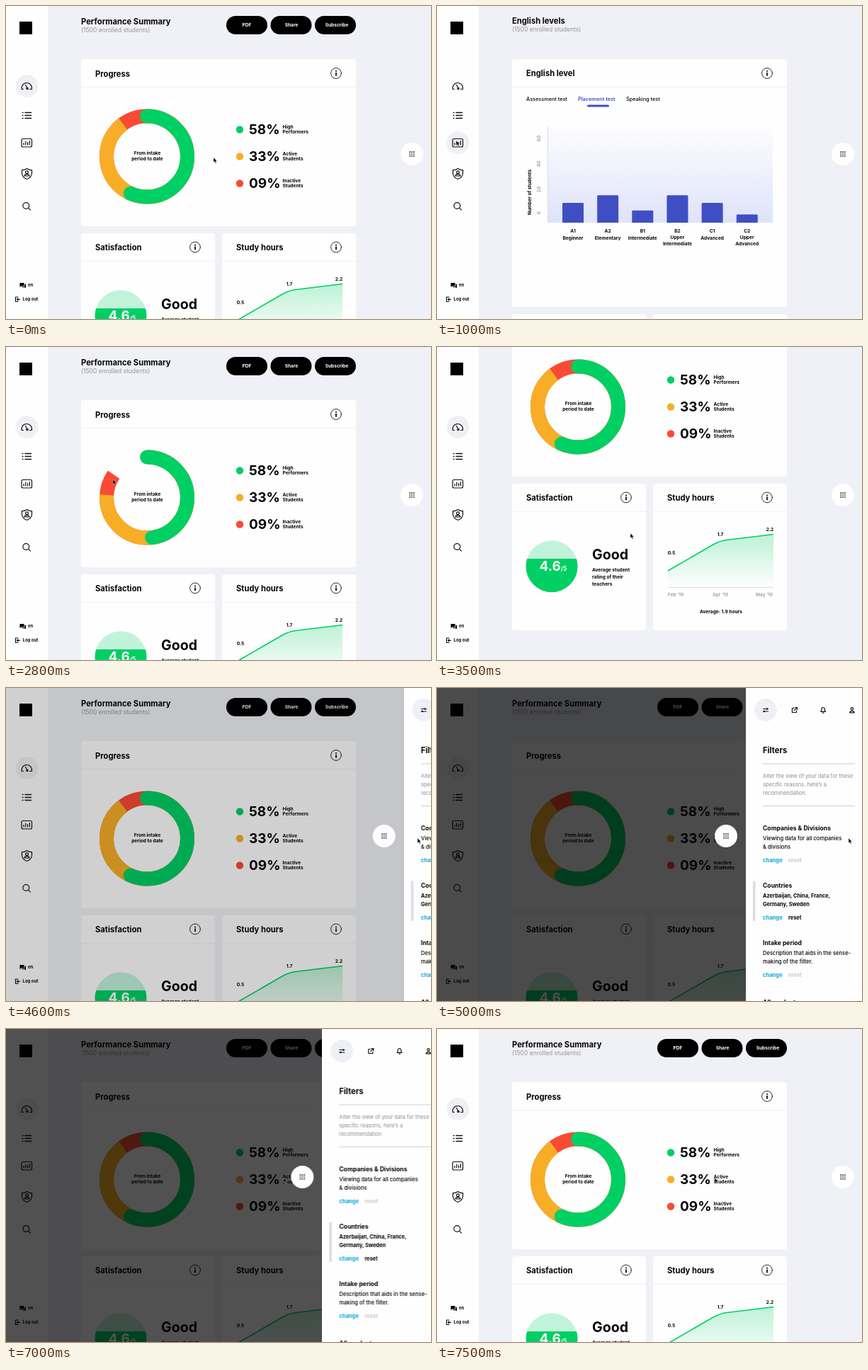
An HTML page for the animation above (7600 ms loop, 600x442 px).

```html
<!DOCTYPE html>
<html lang="en">
<head>
<meta charset="utf-8">
<title>Student dashboard</title>
<style>
html, body { margin: 0; width: 100%; height: 100%; overflow: hidden; background: #f0f1f6; }
svg { display: block; width: 600px; height: 442px; }
text { font: 700 6.6px Inter, "Open Sans", sans-serif; fill: #060607; }
.title { font-size: 11.2px; }
.sub { font-size: 8.5px; font-weight: 400; fill: #949498; }
.big { font-size: 19px; }
.mid { text-anchor: middle; }
.white { fill: #fff; }
.grey { fill: #8f8f94; font-weight: 500; }
.tab { font-size: 7.3px; font-weight: 500; }
.tab.on { fill: #3f4fc3; font-weight: 600; }
.head { font-size: 8.6px; }
.body { font-size: 7.6px; font-weight: 500; }
.note { font-size: 7.5px; font-weight: 400; fill: #8e8e93; }
.strong { font-size: 7.4px; }
.link { font-size: 7.6px; fill: #12a5dd; }
.off { fill: #ccc; }
.card { fill: #fefefe; }
.rule { stroke: #f1f1f5; }
.line { fill: none; stroke: #111113; stroke-width: 1.2; stroke-linecap: round; stroke-linejoin: round; }

.cursor, .scroll, .drawer, .shade, .filters, .home, .levels, .spot, .bar, .num, .arc {
  animation: 7.6s linear infinite;
}
.cursor { animation-name: cursor; animation-timing-function: ease-in-out; }
.scroll { animation-name: scroll; animation-timing-function: ease-in-out; }
.filters { animation-name: filters; animation-timing-function: ease-in-out; }
.drawer { animation-name: drawer; }
.shade { animation-name: shade; }
.home { animation-name: home; }
.levels { animation-name: levels; }
.spot { animation-name: spot; }
.bar { animation-name: bar; transform-origin: 0 306px; }
.num { animation-name: num; }
.arc { animation-name: arc; fill: none; stroke-width: 20; stroke-dasharray: var(--len) 200; }

@keyframes cursor {
  0% { transform: translate(293px, 214px); }
  6.58%, 19.74% { transform: translate(27px, 190px); }
  25%, 32.89% { transform: translate(27px, 110px); }
  40.79%, 51.32% { transform: translate(273px, 263px); }
  56.58%, 68.42% { transform: translate(581px, 212px); }
  73.68%, 81.58% { transform: translate(565px, 219px); }
  88.16%, 100% { transform: translate(392px, 210px); }
}
@keyframes scroll {
  0%, 40.79% { transform: none; }
  46.05%, 47.37% { transform: translateY(-128px); }
  51.32%, 100% { transform: none; }
}
@keyframes filters {
  0%, 68.42% { transform: none; }
  77.63%, 78.95% { transform: translateY(-65px); }
  85.53%, 100% { transform: none; }
}
@keyframes drawer {
  0%, 57.89% { transform: translateX(178px); }
  59.21% { transform: translateX(168px); }
  60.53% { transform: translateX(139px); }
  61.84% { transform: translateX(98px); }
  63.16% { transform: translateX(58px); }
  64.47% { transform: translateX(30px); }
  65.79% { transform: translateX(13px); }
  68.42%, 90.79% { transform: none; }
  92.11% { transform: translateX(23px); }
  93.42% { transform: translateX(74px); }
  94.74% { transform: translateX(125px); }
  96.05% { transform: translateX(158px); }
  97.37% { transform: translateX(173px); }
  98.68%, 100% { transform: translateX(178px); }
}
@keyframes shade {
  0%, 57.89% { opacity: 0; }
  59.21% { opacity: .04; }
  60.53% { opacity: .18; }
  61.84% { opacity: .34; }
  63.16% { opacity: .51; }
  64.47% { opacity: .63; }
  65.79% { opacity: .7; }
  68.42%, 90.79% { opacity: .75; }
  92.11% { opacity: .68; }
  93.42% { opacity: .44; }
  94.74% { opacity: .22; }
  96.05% { opacity: .08; }
  97.37% { opacity: .02; }
  98.68%, 100% { opacity: 0; }
}
@keyframes home {
  0%, 10.5% { opacity: 1; }
  10.51%, 31.55% { opacity: 0; }
  31.56%, 100% { opacity: 1; }
}
@keyframes levels {
  0%, 10.5% { opacity: 0; }
  10.51%, 31.55% { opacity: 1; }
  31.56%, 100% { opacity: 0; }
}
@keyframes spot {
  0%, 10.5% { transform: none; }
  10.51%, 31.55% { transform: translateY(80px); }
  31.56%, 100% { transform: none; }
}
@keyframes bar {
  0%, 10.5% { transform: scaleY(0); animation-timing-function: ease-out; }
  19.74%, 100% { transform: none; }
}
@keyframes num {
  0%, 13.16% { opacity: 0; }
  18.42%, 100% { opacity: 1; }
}
@keyframes arc {
  0%, 31.55% { stroke-dashoffset: 0; }
  31.56% { stroke-dashoffset: var(--len); animation-timing-function: ease-out; }
  39.47%, 100% { stroke-dashoffset: 0; }
}
</style>
</head>
<body>
<svg viewBox="0 0 600 442">
  <defs>
    <linearGradient id="plot" x2="0" y2="1">
      <stop stop-color="#fdfdff"/><stop offset="1" stop-color="#dfe3f9"/>
    </linearGradient>
    <linearGradient id="area" x2="0" y2="1">
      <stop stop-color="#00cf64" stop-opacity=".26"/><stop offset="1" stop-color="#00cf64" stop-opacity="0"/>
    </linearGradient>
    <clipPath id="dial"><circle cx="162" cy="437.700" r="36.500"/></clipPath>
    <clipPath id="panel"><rect y="64" width="177" height="378"/></clipPath>
    <g id="info">
      <circle class="line" r="7.400" style="stroke-width:.9"/>
      <circle cy="-3" r="1"/><path d="M0 -1V3.800" stroke="#000" stroke-width="1.700"/>
    </g>
    <g id="dots"></g>
  </defs>

  <rect width="600" height="442" fill="#f0f1f6"/>

  <g class="home"><g class="scroll">
    <text class="title" x="106" y="25.500">Performance Summary</text>
    <text class="sub" x="106" y="36.700">(1500 enrolled students)</text>
    <rect x="311" y="14" width="58" height="26" rx="13"/>
    <rect x="373.500" y="14" width="58" height="26" rx="13"/>
    <rect x="436" y="14" width="58" height="26" rx="13"/>
    <text class="mid white" x="340" y="29.400">PDF</text>
    <text class="mid white" x="403" y="29.400">Share</text>
    <text class="mid white" x="467" y="29.400">Subscribe</text>

    <rect class="card" x="106" y="75" width="388" height="236" rx="4"/>
    <path class="rule" d="M106 114.500H494"/>
    <text class="title" x="126" y="99.500">Progress</text>
    <use href="#info" x="466" y="95"/>
    <g transform="translate(199 212.600) rotate(-90)">
      <circle class="arc" r="57" pathLength="100" stroke="#fa4a33" style="--len:100"/>
      <circle class="arc" r="57" pathLength="100" stroke="#f7ae26" style="--len:89.9"/>
      <circle class="arc" r="57" pathLength="100" stroke="#00cf64" stroke-linecap="round" style="--len:56.7"/>
    </g>
    <text class="mid" x="199.500" y="209.800">From intake</text>
    <text class="mid" x="199.500" y="218.300">period to date</text>
    <g id="shares"></g>

    <rect class="card" x="106" y="321" width="189" height="207" rx="4"/>
    <rect class="card" x="305" y="321" width="189" height="207" rx="4"/>
    <path class="rule" d="M106 360.500H295M305 360.500H494"/>
    <text class="title" x="126" y="345">Satisfaction</text>
    <text class="title" x="325" y="345">Study hours</text>
    <use href="#info" x="267" y="340.500"/>
    <use href="#info" x="466" y="340.500"/>

    <g clip-path="url(#dial)">
      <rect x="125" y="400" width="74" height="75" fill="#c1f3db"/>
      <rect x="125" y="427" width="74" height="50" fill="#00cf64"/>
    </g>
    <text class="big white" x="144.500" y="443.800">4.6<tspan style="font-size:8.300px">/5</tspan></text>
    <text class="big" x="219" y="427.500" style="font-size:19.600px">Good</text>
    <text x="219" y="444.500">Average student</text>
    <text x="219" y="454.500">rating of their</text>
    <text x="219" y="464.500">teachers</text>

    <path d="M326 444L390 407Q400 401.500 409 400.500L475 392.500V467H326Z" fill="url(#area)"/>
    <path d="M326 444L390 407Q400 401.500 409 400.500L475 392.500" fill="none" stroke="#00cf64" stroke-width="1.600"/>
    <path d="M326 467.500H475" stroke="#dadade"/>
    <text class="mid" x="331" y="421">0.5</text>
    <text class="mid" x="400" y="394.500">1.7</text>
    <text class="mid" x="470" y="388">2.2</text>
    <text class="grey" x="326" y="479.500">Feb ’19</text>
    <text class="grey mid" x="400" y="479.500">Apr ’19</text>
    <text class="grey" x="474" y="479.500" text-anchor="end">May ’19</text>
    <text class="mid" x="401" y="504.400">Average: 1.9 hours</text>
  </g></g>

  <g class="levels">
    <text class="title" x="106" y="24.500">English levels</text>
    <text class="sub" x="106" y="35.700">(1500 enrolled students)</text>
    <rect class="card" x="106" y="75" width="388" height="350" rx="4"/>
    <rect class="card" x="106" y="435" width="189" height="30" rx="4"/>
    <rect class="card" x="305" y="435" width="189" height="30" rx="4"/>
    <path class="rule" d="M106 114.500H494"/>
    <text class="title" x="126" y="99">English level</text>
    <use href="#info" x="466" y="95"/>
    <text class="tab" x="126" y="134">Assessment test</text>
    <text class="tab on" x="199" y="134">Placement test</text>
    <text class="tab" x="267" y="134">Speaking test</text>
    <rect x="212" y="139.500" width="31" height="3" rx="1.500" fill="#3f4fc3"/>
    <rect x="156" y="170" width="318" height="136" fill="url(#plot)"/>
    <path d="M156.500 170V306" stroke="#dcdce2"/>
    <text class="mid" transform="translate(133 263) rotate(-90)">Number of students</text>
    <g id="bars"></g>
  </g>

  <rect width="59" height="442" fill="#fefefe"/>
  <rect x="19" y="22" width="18" height="18"/>
  <circle class="spot" cx="29.500" cy="113" r="16" fill="#f0f0f4"/>
  <g class="line">
    <path d="M24.500 117.500H22.200A7.300 7.300 0 1 1 36.400 117.500H33.500M27.500 111.500L30.500 117"/>
    <circle cx="30" cy="116.500" r="1.200"/>
    <path d="M27 150.500H35.500M27 154.500H35.500M27 158.500H35.500M23.300 150.500H24M23.300 154.500H24M23.300 158.500H24" stroke-width="1.500"/>
    <rect x="22" y="187.500" width="14.500" height="11.500" rx="2"/>
    <path d="M25 196V193.500M27.800 196V191M30.600 196V192.500M33.400 196V190.500"/>
    <path d="M29.500 229.500Q33 232 36.500 231.500V236.500Q36 242 29.500 244.500Q23 242 22.500 236.500V231.500Q26 232 29.500 229.500Z"/>
    <circle cx="29.500" cy="234.800" r="1.900"/>
    <path d="M26 240Q26.300 237.700 29.500 237.700Q32.700 237.700 33 240Z"/>
    <circle cx="28.300" cy="282" r="4.400"/><path d="M31.600 285.300L34.500 288.200"/>
    <path d="M17 411H13.500V417.500H17M19.500 414.300H15.500M17 412.800L15.500 414.300L17 415.800"/>
  </g>
  <path d="M19.500 391H25.500V395.500H21.500L19.500 397ZM26.300 392.800H28V398.500L26.300 397.200H22.500V396.200H26.300Z"/>
  <text x="31" y="396" style="font-size:6px">en</text>
  <text x="23.500" y="416.200" style="font-size:6px">Log out</text>

  <rect class="shade" width="600" height="442"/>

  <g transform="translate(423 0)"><g class="drawer">
    <circle cx="-28" cy="209" r="16" fill="#fefefe"/>
    <use href="#dots" x="-28" y="209"/>
    <rect width="200" height="442" fill="#fefefe"/>
    <circle cx="28" cy="31" r="16" fill="#eff0f5"/>
    <g class="line">
      <path d="M24.500 29.500H31.500M24.500 33H31.500"/>
      <circle cx="30" cy="29.500" r=".7"/><circle cx="26" cy="33" r=".7"/>
      <path d="M68 28.500H65.500V34.500H71.500V32M69.500 27.500H72.500V30.500M72.500 27.500L68.300 31.700"/>
      <path d="M105.800 33.300Q107 32 107 30Q107 27.500 109.200 27.500Q111.400 27.500 111.400 30Q111.400 32 112.600 33.300ZM108.500 35.200H110"/>
      <circle cx="150" cy="29.300" r="1.700"/>
      <path d="M146.700 34.800Q147 32.300 150 32.300Q153 32.300 153.300 34.800Z"/>
    </g>
    <g clip-path="url(#panel)"><g class="filters" id="filters">
      <text class="title" x="24" y="91.700">Filters</text>
      <path d="M24 107H154M24 166.500H154" stroke="#cfcfd3"/>
      <text class="note" x="24" y="127">Alter the view of your data for these</text>
      <text class="note" x="24" y="139">specific reasons, here’s a</text>
      <text class="note" x="24" y="151">recommendation.</text>
      <rect x="10" y="272.500" width="3.500" height="56.500" rx="1" fill="#dddde1"/>
    </g></g>
  </g></g>

  <path class="cursor" d="M0 0V7L1.700 5.500L2.900 8.200L4.100 7.700L2.900 5H5Z" stroke="#fff" stroke-width=".4"/>
</svg>
<script>
const add = (id, markup) => document.getElementById(id).insertAdjacentHTML('beforeend', markup);
const label = (x, y, text, cls = '') => `<text class="${cls}" x="${x}" y="${y}">${text}</text>`;

for (let i = 0; i < 9; i++)
  add('dots', `<circle cx="${(i % 3 - 1) * 2.8}" cy="${(Math.floor(i / 3) - 1) * 2.8}" r=".85"/>`);

[['58%', 'High', 'Performers', '#00cf64'],
 ['33%', 'Active', 'Students', '#f7ae26'],
 ['09%', 'Inactive', 'Students', '#fa4a33']].forEach(([share, top, bottom, color], i) => {
  const y = 174.5 + i * 38;
  add('shares', `<circle cx="330" cy="${y}" r="5.2" fill="${color}"/>` +
    label(343, y + 6.4, share, 'big') + label(390.5, y - 1.7, top) + label(390.5, y + 5.8, bottom));
});

[[60, 187], [40, 223], [20, 259], [0, 292]].forEach(([n, y]) =>
  add('bars', `<text class="grey mid" transform="translate(145.5 ${y}) rotate(-90)">${n}</text>`));

[[38, 241, 'A1', 'Beginner'], [46, 216, 'A2', 'Elementary'], [21, 266, 'B1', 'Intermediate'],
 [46, 216, 'B2', 'Upper', 'Intermediate'], [38, 241, 'C1', 'Advanced'],
 [18, 279, 'C2', 'Upper', 'Advanced']].forEach(([n, top, ...names], i) => {
  const x = 177 + i * 49.15, mid = x + 15;
  const step = names.length > 2 ? 9 : 10;
  add('bars', `<path class="bar" fill="#3f4fc3" d="M${x} 306V${top + 2}q0 -2 2 -2h26q2 0 2 2V306Z"/>` +
    label(mid, top - 7.8, n, 'mid num') +
    names.map((name, row) => label(mid, 320.3 + row * step, name, 'mid')).join(''));
});

[[197, 'Companies &amp; Divisions', ['Viewing data for all companies', '&amp; divisions']],
 [278, 'Countries', ['Azerbaijan, China, France,', 'Germany, Sweden'], true],
 [359, 'Intake period', ['Description that aids in the sense-', 'making of the filter.']],
 [443.5, 'All products', ['Viewing data for all products.']]].forEach(([y, name, lines, active]) => {
  const linkY = y + 25 + lines.length * 12;
  add('filters', label(24, y + 3.5, name, 'head') +
    lines.map((line, row) => label(24, y + 18 + row * 12, line, active ? 'strong' : 'body')).join('') +
    label(24, linkY, 'change', 'link') + label(60, linkY, 'reset', active ? 'strong' : 'link off'));
});
</script>
</body>
</html>
```
